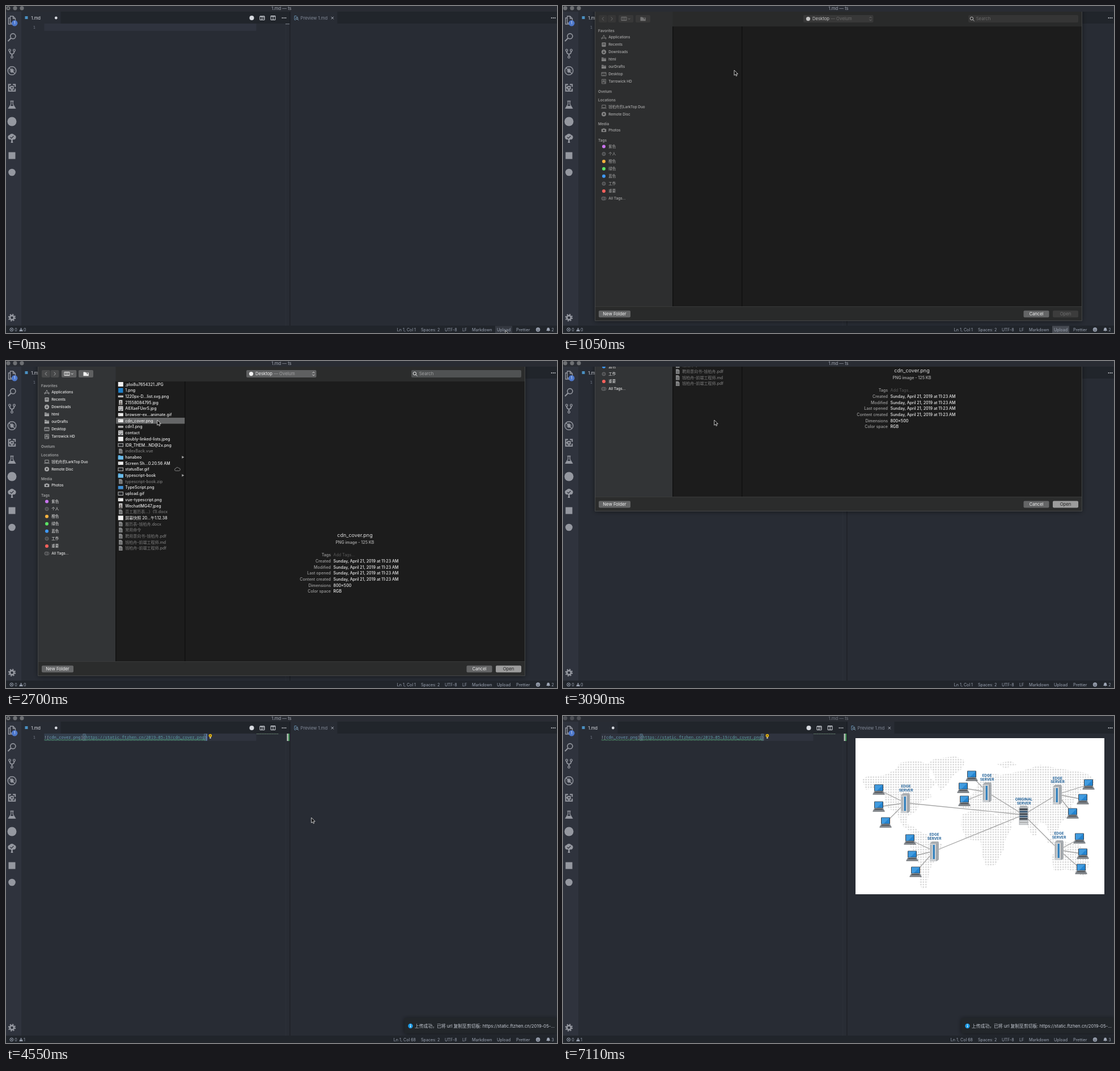
Write an HTML page that moves like this. It is 972 by 576 pixels and loops after 7.21 s.

```html
<!DOCTYPE html>
<html lang="en">
<head>
<meta charset="utf-8">
<title>Upload from the editor</title>
<style>
html, body { margin: 0; width: 100%; height: 100%; overflow: hidden; background: #282c34; }
svg { display: block; width: 972px; height: 576px; font-family: Inter, "Noto Sans CJK SC", "Noto Sans CJK", sans-serif; }
text { white-space: pre; }
.code { font-family: "Noto Sans Mono", "DejaVu Sans Mono", monospace; }
#dialog {
  --bar: #292a2a; --side: #2d2e2f; --text: #ababab; --head: #9b9b9b; --btn: #383838; --nav: #363636;
  --icon: #828282; --sign: #747474; --field: #353535; --hint: #6a6a6a; --path: #c4c4c4;
  --open: #3c3c3c; --openText: #707070;
}
#dialog.on {
  --bar: #2b2c2c; --side: #323436; --text: #e9e9e9; --head: #a2a3a4; --btn: #5f6061; --nav: #48494a;
  --icon: #a5a6a7; --sign: #f0f0f0; --field: #505253; --hint: #a0a1a2; --path: #f2f2f2;
}
#dialog.picked { --open: #9c9c9c; --openText: #242424; }
</style>
</head>
<body>
<script>
const LOOP = 7210;

// ---- markup helpers ----
const box = (x, y, w, h, fill, more = '') =>
  `<rect x="${x}" y="${y}" width="${w}" height="${h}" style="fill:${fill}" ${more}/>`;
const dot = (x, y, r, fill, more = '') => `<circle cx="${x}" cy="${y}" r="${r}" style="fill:${fill}" ${more}/>`;
const line = (d, color, w = 1, more = '') =>
  `<path d="${d}" style="fill:none;stroke:${color};stroke-width:${w}" ${more}/>`;
const shape = (d, fill, more = '') => `<path d="${d}" style="fill:${fill}" ${more}/>`;
const at = (x, y, body) => `<g transform="translate(${x} ${y})">${body}</g>`;
// y is the middle of the capitals
const text = (x, y, s, size = 7.12, fill = '#9da5b4', more = '') =>
  `<text x="${x}" y="${(y + size * 0.364).toFixed(2)}" font-size="${size}" style="fill:${fill}" ${more}>${s}</text>`;
const mid = 'text-anchor="middle"', end = 'text-anchor="end"', bold = 'font-weight="600"', medium = 'font-weight="500"';
const layer = (id, body, more = '') => `<g id="${id}" ${more}>${body}</g>`;

const grey = '#9598a0';
const HOST = 'https://static.ftzhen';

// ---- editor window ----
function activityBar() {
  const icons = [
    [25, line('M-3-7h5l4 4v8h-9zM2-7v4h4M-3-4h-3v11h8v-2', grey, 1.3)],
    [55, `<circle cx="1.8" cy="-1.8" r="4.6" style="fill:none;stroke:${grey};stroke-width:1.6"/>` + line('M-1.5 1.5L-7 7', grey, 2)],
    [84, [[-4, -6], [4, -6], [0, 6]].map(p => `<circle cx="${p[0]}" cy="${p[1]}" r="1.8" style="fill:none;stroke:${grey};stroke-width:1.3"/>`).join('') +
      line('M-4-4q0 4 4 5q4-1 4-5M0 1v3', grey, 1.8)],
    [114, line('M-7.3 0a7.3 7.3 0 1 0 14.6 0a7.3 7.3 0 1 0-14.6 0M-5-5L5 5', grey, 1.4) +
      line('M-5 0h10M-4-3l8 6M-4 3l8-6M0-5v9', grey, .8) + '<ellipse rx="2.4" ry="3.4" fill="' + grey + '"/>'],
    [144, line('M-1.5-5.7H-5.7V5.7H5.7V1.5M1.5-5.7H5.7V-1.5M-2.2-2.2h4.4v4.4h-4.4zM-5.7 0h3M0 5.7v-3', grey, 2)],
    [174, line('M-3-6.5h6M-1.7-6v5L-6 6H6L1.7-1v-5', grey, 1.3) + shape('M-3.4 2h6.8L6 6.6H-6z', grey)],
    [203.5, dot(0, 0, 8, grey)],
    [233, shape('M-7-1a4 4 0 0 1 3-5a5 5 0 0 1 8 0a4 4 0 0 1 3 5q-1 4-5 3l-1 2 1 4h-4l1-4-1-2q-4 1-5-3z', grey) + line('M-3-2l2 2 4-4', '#2f333d', 1.2)],
    [263.5, box(-6, -6, 12, 12, grey)],
    [293, dot(0, 0, 6.3, grey)],
    [549, `<circle r="3.6" style="fill:none;stroke:${grey};stroke-width:2.6"/>` +
      `<circle r="5.7" style="fill:none;stroke:${grey};stroke-width:2;stroke-dasharray:2.24 2.24"/>`],
  ];
  return box(0, 10, 27, 553, '#2f333d') + icons.map(([y, body]) => at(10.5, y, body)).join('') +
    dot(15.2, 30.3, 5.2, '#4d78cc') + text(15.2, 30.3, '1', 6, '#f4f6fa', mid);
}

function tabs() {
  const ink = '#d7dae0', dots = x => [-3, 0, 3].map(d => dot(x + d, 21, .9, ink)).join('');
  return box(27, 10, 945, 21, '#21252b') + box(27, 10, 69.5, 21, '#282c34') +
    box(33.5, 18, 5, 5, '#4a90c2') + text(44.3, 21, '1.md', 7.7, ink) + dot(88.3, 21, 2.4, ink) +
    dot(433.5, 21, 4, ink) + dots(490.5) +
    line('M448 18h8v6.5h-8zM448 18.5h8M451.5 18v6.5M453 21h3', ink, 1) +
    line('M467.2 17.5h7.8v7h-7.8zM467 18h8M471.1 17.5v7', ink, 1) +
    box(502, 10, 82.5, 21, '#282c34') +
    line('M509 24v-6.5h3l2 2v1M509 24.5h2', '#6d9bbf', .9) + line('M511.5 22a1.7 1.7 0 1 0 3.4 0a1.7 1.7 0 1 0-3.4 0M514.5 23.5l1.7 1.7', '#8fb0c8', .9) +
    text(519.5, 21, 'Preview 1.md', 7.7, '#828997') + line('M573.6 18.9l4.4 4.4m0-4.4l-4.4 4.4', '#a8adb8', 1) + dots(965.5);
}

function statusBar() {
  const c = '#9da5b4', items = [[732, 'Spaces: 2'], [774, 'UTF-8'], [805, 'LF'], [822, 'Markdown'], [866, 'Upload'], [900, 'Prettier']];
  return box(0, 563, 972, 13, '#21252b') + box(863, 563.5, 30, 12.5, '#343840', 'id="hot"') +
    line('M6.9 570a3 3 0 1 0 6 0a3 3 0 1 0-6 0M8.5 568.6l2.8 2.8m0-2.8l-2.8 2.8', c, .9) + text(15.2, 570, '0') +
    shape('M26.6 566.5l3.4 6.4h-6.8z', c) + box(26.2, 568.7, .9, 2.2, '#21252b') + text(31, 570, '0', 7.12, c, 'id="warn"') +
    text(723, 570, '', 7.12, c, end + ' id="pos"') + items.map(([x, s]) => text(x, 570, s)).join('') +
    dot(938.5, 570, 3.7, c) + dot(937.2, 569, .6, '#21252b') + dot(939.8, 569, .6, '#21252b') + line('M936.5 570.7q2 2.4 4 0', '#21252b', .8) +
    shape('M953 572q1.2-1 1.2-3a2.4 2.4 0 0 1 4.8 0q0 2 1.2 3zM955.6 572.5h2l-1 1z', c) + text(962.3, 570, '2', 7.12, c, 'id="bell"');
}

function editor() {
  const cw = 286.5 / 67, x0 = 67.5, col = n => x0 + n * cw;
  let wave = `M${x0} 42.2`;
  for (let i = 0; i < 95; i++) wave += `q.75 ${i % 2 ? 1.2 : -1.2} 1.5 0t1.5 0`;
  const span = (s, c) => `<tspan style="fill:${c}">${s}</tspan>`;
  const bracket = n => `<rect x="${col(n)}" y="31.8" width="${cw}" height="11.2" style="fill:#3c5060;stroke:#6a8496;stroke-width:.6"/>`;
  return box(67.5, 31, 374, 12.8, '#2f333e') + box(493, 31, .6, 532, '#30343c') +
    text(52, 37.5, '1', 7.13, '#7a8290', end + ' class="code"') +
    layer('blank', box(493, 31, 7.5, 1.2, '#747982')) +
    layer('link', box(x0, 31, 286.5, 12.8, '#333e4c', 'id="sel"') + bracket(16) + bracket(66) +
      text(x0, 37.5, span('![', '#98a2ae') + span('cdn_cover.png', '#6b9db3') + span('](', '#98a2ae') +
        span(HOST + '.cn/2019-05-19/cdn_cover.png', '#5f9ca5') + span(')', '#98a2ae'), 7.13, '#9da5b4', 'class="code"') +
      line(`M${col(17)} 41.2H${col(66)}`, '#548b8c', .6, 'id="under"') +
      layer('wave', line(wave, '#4fa567', .9)) +
      line('M442 31.5h39', '#66806f', 1, 'stroke-dasharray="2.4 .6"') +
      box(495.5, 31, 2.7, 13, '#b3bbb4') + box(498.2, 31, 2.3, 13, '#3f9a55') +
      layer('bulb', dot(360.4, 34.6, 2.8, '#e5b512') + dot(360.4, 34.4, 1, '#51430f') + box(359.3, 37.2, 2.2, 2.6, '#c9c9c0'))) +
    box(353.6, 31.5, 1, 12, '#6f95e8', 'id="caret"');
}

// ---- preview picture ----
function network() {
  const land = 'M527 112l10-6 30-2 20-10 8-12 30-4 22 8-2 20 14 12-14 14 6 10-20 10-8 16-14 8-4 14 16 6 12 12-10 2-24-16-10-22-18-12-6-26-14-8-16 4z' +
    'M640 86l16-11 36-4 18 8-6 14-16 12-12 18-10 8-8-14-6-20z' +
    'M610 206l16-4 24 10 18 14-4 18-12 16-6 14-4 28-8 3-6-10 2-32-12-22-10-20z' +
    'M703 174l20-8 30 4 14 6 16 18h10l-12 22-4 20-14 26-16 4-8-22-2-22-26-6-9-22z';
  const east = 'M702 162l4-16 16-8 10-18 20-20 20 4 40-8 30-10 30 6 50 8 17 12-4 10-18 6-12 14-6 14-4 20-16 10-10 26-10-2-8-20-12-4-4 24h-8l-12-26-16-4-12 14-16-16-10-10h-24z' +
    'M862 246l14-12 22-6 12-2 14 18 4 18-8 22-14-8-18-6-22 4zM850 214l30 6 32 8-6 6-50-10zM764 84l26-5 10 7-20 6z';
  const hub = [812.5, 174];
  const sites = [
    { at: [604, 153], label: [605, 124], pcs: [[557, 130], [557, 160], [569, 188]] },
    { at: [748, 134], label: [748, 105], pcs: [[721, 106], [706, 127], [708, 150]] },
    { at: [872, 138], label: [872.5, 109.5], pcs: [[927, 121], [917, 147], [899, 172]] },
    { at: [655, 238], label: [655, 209], pcs: [[612, 218], [616, 247], [622, 275]] },
    { at: [875, 236], label: [875, 207], pcs: [[911, 216], [917, 243], [914, 270]] },
  ];
  const wire = (a, b) => line(`M${a}L${b}`, '#a4a4a4', 1.3);
  const tower = shape('M-8-13l4-4H7l1 3V15l-4 3H-8z', '#a9adb1') + box(-8, -13, 12, 31, '#cdd0d3') +
    box(-2.4, -11, 3.2, 25, '#2e7fbd') + box(-6.4, -11, 1.2, 25, '#909498') + line('M4-13V17', '#7d8287', .8);
  const rack = shape('M-8-12l2-4H6l2 4V18H-8z', '#aeb2b6') + [0, 1, 2, 3, 4].map(i => box(-7, -11 + i * 4.2, 14, 2.8, i % 2 ? '#3b5b78' : '#3d444c')).join('') +
    box(-7, 10.5, 14, 7, '#cfd2d4') + line('M-7 13.5H7', '#888', .8);
  const laptop = box(-8, -9.5, 16, 12, '#39424c', 'rx="1"') + box(-7, -8.5, 14, 10, '#2484d0') + shape('M-7-8.5H7L-3 1.5H-7z', '#419bdf') +
    shape('M-8 2.5H8l2.5 5h-21z', '#8b8f94') + shape('M-6.5 3.3h13l1 2h-15z', '#4b5056') + box(-10.5, 7.2, 21, 1.3, '#5c6166');
  const label = ([x, y], s) => [s, 'SERVER'].map((w, i) => text(x, y + i * 6.5, w, 6.3, '#23639a', mid + ' font-weight="700"')).join('');
  return box(516, 39, 439, 275, '#fff') + `<path d="${land}${east}" fill="url(#dots)"/>` +
    sites.map(s => wire(hub, s.at) + s.pcs.map(p => wire(s.at, p)).join('')).join('') +
    sites.map(s => at(...s.at, tower) + s.pcs.map(p => at(...p, laptop)).join('') + label(s.label, 'EDGE')).join('') +
    at(...hub, rack) + label([813, 147], 'ORIGINAL');
}

function toast() {
  return box(703, 532, 270, 27, '#21252b', 'filter="url(#soft)"') + dot(713.5, 546, 4.2, '#1c9be6') +
    box(713, 545, 1.1, 3.4, '#fff') + dot(713.5, 543.5, .7, '#fff') +
    text(721, 546, '', 7.8, '#c5cad3', 'id="msg"') +
    layer('tools', dot(944, 546, 2.4, 'none', 'stroke="#c5cad3" stroke-width="1.6"') + line('M956.5 543.5l5 5m0-5l-5 5', '#c5cad3', 1));
}

// ---- file dialog ----
const ME = '钱柏舟';
const FILES = [
  ['w', ';ploi8u7654321.JPG'], ['b', '1.png'], ['s', '1220px-D...list.svg.png'], ['p', '21558084795.jpg'],
  ['x', 'A6XaeFUerS.jpg'], ['m', 'browser-ex...animate.gif'], ['m', 'cdn_cover.png'], ['s', 'cdn1.png'],
  ['x', 'contact'], ['w', 'doubly-linked-lists.jpeg'], ['o', 'IDR_THEM...ND@2x.png'], ['d', 'indexBack.vue'],
  ['f', 'hanabeo'], ['m', 'Screen Sh...0.20.56 AM'], ['o', 'statusBar.gif'], ['f', 'typescript-book'],
  ['d', 'typescript-book.zip'], ['t', 'TypeScript.png'], ['o', 'upload.gif'], ['m', 'vue-typescript.png'],
  ['p', 'WechatIMG47.jpeg'], ['d', '员工履历表...）(1).docx'], ['w', '屏幕快照 20...午1.12.38'], ['d', `履历表-${ME}.docx`],
  ['d', '常用命令'], ['d', `聘用意向书-${ME}.pdf`], ['d', `${ME}-前端工程师.md`], ['d', `${ME}-前端工程师.pdf`],
];
const rowY = i => 41 + i * 10.7;
const doc = shape('M-3.3-4.2h4.4l2.2 2.2v6.2h-6.6z', '#858687') + line('M-2 0h4M-2 2h4', '#4b4c4d', .7);
const thumbs = {
  w: box(-4.5, -4, 9, 8, '#f1f1f1'),
  m: box(-4.5, -2.8, 9, 5.6, '#eee') + box(-3, -.6, 1.6, 1.2, '#9a8f88'),
  s: box(-4.5, -1.6, 9, 3.2, '#d6d6d6') + line('M-3.5 0h7', '#777', .8),
  b: box(-4.2, -4.2, 8.4, 8.4, '#1f7fc8'),
  t: box(-4.5, -2.8, 9, 5.6, '#3f8fd4'),
  p: box(-3, -4.3, 6, 8.6, '#d2d2d2') + dot(0, -1, 1.5, '#6d6663') + box(-2, 1, 4, 3, '#6d6663'),
  x: box(-4.2, -4.2, 8.4, 8.4, '#dcdcdc') + line('M-3-2h3M1-2h2M-3 1h2M0 1h3M-2 3h4', '#55585c', 1.2),
  o: box(-4.3, -2.8, 8.6, 5.6, '#26282b', 'stroke="#d5d5d5" stroke-width=".8"'),
  f: shape('M-4.5-3.5h3.5l1 1h4.5v6.5h-9z', '#4fa5d8') + box(-4.5, -1.4, 9, 5.4, '#6cbbe8'),
  d: doc,
};

function fileList() {
  return box(194, 99.9, 121.3, 10.6, '#656667', 'id="pick"') + FILES.map(([kind, name], i) => {
    const late = i === 6 || i === 14, y = rowY(i);
    const icon = at(202.3, y, thumbs[kind]);
    return (late ? `<g class="late">${icon}</g><g class="early">${at(202.3, y, doc)}</g>` : icon) +
      text(210.3, y, name, 7, kind === 'd' ? '#7c7c7c' : '#ececec', medium) +
      (kind === 'f' ? shape(`M310.3 ${y - 2.3}l4 2.3-4 2.3z`, '#a5a5a5') : '') +
      (i === 14 ? line(`M299.5 ${y + 2.6}a2 2 0 0 1 0-4a2.8 2.8 0 0 1 5.2-.6a2.3 2.3 0 0 1 .6 4.6z`, '#9a9a9a', .8) : '');
  }).join('');
}

function sidebar() {
  const c = 'var(--icon)', ln = d => line(d, c, .9);
  const folder = shape('M-4-3.3h3l1 1h4v5.6h-8z', c) + line('M-4-1h8', 'var(--side)', .6);
  const places = [
    [55, 'Applications', ln('M-3.8 3.8L0-3.8 3.8 3.8M-5 1.4H5')],
    [68, 'Recents', box(-3.6, -3.8, 7.2, 7.6, c, 'rx="1"') + line('M-2.2-1.6h4.4M-2.2.2h4.4', 'var(--side)', .8)],
    [81, 'Downloads', dot(0, 0, 4.2, c) + line('M0-2.4v4.2M-1.8.2L0 2l1.8-1.8', 'var(--side)', 1)],
    [94, 'html', folder], [107, 'ourDrafts', folder],
    [120, 'Desktop', ln('M-4-3h8v6h-8zM-4-1.6h8M-2.5 1.8h5')],
    [133, 'Tarrowick HD', ln('M-3.4-3.8h6.8v7.6h-6.8zM-3.4 1h6.8') + ln('M-2-2h4M-2-.4h4M1 2.4h1.4')],
    [177.3, ME + '的LarkTop Duo', ln('M-3.2-2.8h6.4v4.4h-6.4zM-4.8 2.8h9.6')],
    [190.4, 'Remote Disc', dot(0, 0, 4, c) + dot(0, 0, 1.3, 'var(--side)')],
    [219, 'Photos', box(-4.3, -2.4, 8.6, 5.4, c, 'rx=".8"') + box(-1.6, -3.4, 3.2, 1.4, c) + dot(0, .3, 1.5, 'var(--side)')],
  ];
  const heads = [[43.5, 'Favorites'], [150.5, 'Ovelum'], [166, 'Locations'], [207.7, 'Media'], [236.5, 'Tags']];
  const tags = [['紫色', '#c974ee'], ['个人'], ['橙色', '#f7b23f'], ['绿色', '#5be265'], ['蓝色', '#3f98f7'], ['工作'], ['重要', '#f7605c'], ['All Tags...']];
  const ring = 'stroke="#77787a" stroke-width=".8"';
  return box(57, 10, 136.5, 519, 'var(--side)') +
    heads.map(([y, s]) => text(62, y, s, 6.5, 'var(--head)', bold)).join('') +
    places.map(([y, s, icon]) => at(72, y, icon) + text(80.2, y, s, 6.45, 'var(--text)', medium)).join('') +
    tags.map(([s, color], i) => {
      const y = 247.5 + i * 13.08;
      return (i === 7 ? dot(73.3, y, 2.8, 'none', ring) : '') + dot(i === 7 ? 71 : 72, y, 3, color || '#48494b', color ? '' : ring) +
        text(80.2, y, s, 6.5, 'var(--text)', medium);
    }).join('');
}

function dialog() {
  const button = (x, w, s, fill, ink) => box(x, 536.5, w, 12, fill, 'rx="2"') + text(x + w / 2, 542.5, s, 7.7, ink, mid);
  const tool = (x, w, fill = 'var(--btn)') => box(x, 16, w, 13, fill, 'rx="2"');
  const sign = (d, w = 1) => line(d, 'var(--sign)', w);
  const date = 'Sunday, April 21, 2019 at 11:23 AM';
  const info = [['Tags', 'Add Tags...'], ['Created', date], ['Modified', date], ['Last opened', date],
    ['Content created', date], ['Dimensions', '800×500'], ['Color space', 'RGB']];
  return box(56.5, 0, 859, 554.5, '#1e1e1e', 'filter="url(#soft)"') + box(57, 10, 858, 26, 'var(--bar)') + sidebar() +
    box(57, 529, 858, 25, 'var(--bar)') + box(57, 529, 858, .8, '#3d3e3e') +
    box(193.3, 36, 1, 493, '#0b0b0b') + box(315.3, 36, 1, 493, '#0b0b0b') +
    line('M56.6 10V554.4H915.4V10', '#4c4e50', .9) +
    tool(63, 14.8, 'var(--nav)') + tool(78.8, 14.6, 'var(--nav)') + line('M71.8 19.5l-2.6 3 2.6 3M84.8 19.5l2.6 3-2.6 3', 'var(--hint)', 1) +
    tool(98, 26.3) + sign('M103 19.5h9v6h-9zM106 19.5v6M109 19.5v6') + sign('M115 21.8l1.7 1.7 1.7-1.7') +
    tool(128, 26) + shape('M136.5 19.5h3.5l1 1h4.8v5.7h-9.3z', 'var(--sign)') + line('M142 22h3M143.5 20.5v3', 'var(--btn)', .8) +
    tool(424, 123.5) + dot(432.5, 22.6, 3.6, 'var(--path)') +
    text(440, 22.6, 'Desktop <tspan style="fill:var(--hint)">— Ovelum</tspan>', 7.7, 'var(--path)') +
    sign('M540.5 21.3l2-2 2 2M540.5 23.8l2 2 2-2', .9) +
    box(715, 16, 194, 13, 'var(--field)', 'rx="2"') +
    line('M718.2 22a2.7 2.7 0 1 0 5.4 0a2.7 2.7 0 1 0-5.4 0M722.9 24l2.6 2.6', 'var(--path)', .9) + text(728.7, 22.6, 'Search', 7.7, 'var(--hint)') +
    button(63, 56, 'New Folder', '#646566', '#f0f0f0') + button(812.5, 45, 'Cancel', '#646566', '#f0f0f0') +
    button(864, 45, 'Open', 'var(--open)', 'var(--openText)') +
    layer('files', fileList()) +
    layer('info', text(615.5, 307, 'cdn_cover.png', 9, '#dedede', mid) + text(615.5, 319.5, 'PNG image - 125 KB', 7.1, '#a0a0a0', mid + ' ' + bold) +
      info.map(([k, v], i) => {
        const y = 341.5 + i * 10.72;
        return text(573, y, k, 7.1, '#a0a0a0', end + ' ' + medium) + text(577.5, y, v, 7.1, i ? '#ececec' : '#5a5a5a', i ? medium : '');
      }).join(''));
}

document.body.innerHTML = `<svg viewBox="0 0 972 576" width="972" height="576"><defs>
<pattern id="dots" width="4.4" height="4.4" patternUnits="userSpaceOnUse"><circle cx="2.2" cy="2.2" r="1.3" fill="#d2d2d2"/></pattern>
<filter id="soft" x="-10%" y="-20%" width="120%" height="140%"><feDropShadow dx="0" dy="1" stdDeviation="4" flood-color="#000" flood-opacity=".5"/></filter>
<clipPath id="below"><rect y="10" width="972" height="566"/></clipPath></defs>` +
  box(0, 0, 972, 576, '#282c34') + tabs() + editor() + box(500.3, 10, 1.2, 553, '#1c1f25') + activityBar() +
  layer('image', network()) + layer('toast', toast()) + statusBar() +
  box(0, 0, 972, 10, '#292c33') + layer('lights', [4, 16, 28].map(x => dot(x, 3.8, 3.6, '#6d6f73')).join('') + dot(4, 3.8, 1.2, '#26282c', 'id="dirty"')) +
  text(486, 3.8, '1.md — ts', 7.7, '#a3a8b3', mid + ' id="title"') +
  `<g clip-path="url(#below)">${layer('dialog', dialog())}</g>` +
  layer('mouse', `<path d="M0 0V9.2L2.1 7.3 3.5 10.4 5 9.7 3.7 6.7H6.5z" fill="#0b0b0b" stroke="#f2f2f2" stroke-width=".8"/>`) + '</svg>';

// ---- timeline ----
const $ = id => document.getElementById(id);
const show = (id, on) => $(id).style.display = on ? '' : 'none';
const all = (sel, on) => document.querySelectorAll(sel).forEach(e => e.style.display = on ? '' : 'none');
const step = (t, keys) => keys.reduce((v, k) => t >= k[0] ? k : v, keys[0]);

const MOUSE = [[0, 881, 571.5], [210, 860, 561], [720, 600, 330], [1050, 302, 113], [1470, 269.5, 90.5], [1830, 269.5, 98.5],
  [2190, 266.8, 104], [3870, 400, 150], [4160, 538.7, 179], [4940, 620, 240], [5150, 782, 399.5], [5630, 884.3, 526],
  [5900, 895.3, 539.5], [6190, 960, 566], [6430, -20, -20]];
const SHEET = [[0, -600], [720, -180], [1050, 0], [3090, -290], [3450, -600]];
const CARET = [[0, 0], [3870, 1], [5150, 0], [5630, 1], [6190, 0], [6760, 1], [7110, 0]];

function draw(t) {
  const open = t >= 720 && t < 3450, linked = t >= 3870, done = t >= 4160, hover = t >= 6190 && t < 6430, blurred = t >= 7110;
  const picked = t >= 2700;

  show('dialog', open);
  $('dialog').setAttribute('transform', `translate(0 ${step(t, SHEET)[1]})`);
  $('dialog').setAttribute('class', (t >= 1470 ? 'on' : '') + (picked ? ' picked' : ''));
  show('files', t >= 1470);
  all('.late', t >= 2190);
  all('.early', t < 2190);
  show('pick', picked);
  show('info', picked);

  show('hot', t < 1470);
  $('hot').style.fill = t < 720 ? '#343840' : '#474b53';
  $('pos').textContent = linked ? 'Ln 1, Col 68' : 'Ln 1, Col 1';
  $('warn').textContent = done ? '1' : '0';
  $('bell').textContent = done ? '3' : '2';

  show('blank', !linked);
  show('link', linked);
  show('wave', done);
  show('under', t >= 4550);
  show('bulb', t >= 4550);
  show('sel', !blurred);
  show('caret', step(t, CARET)[1]);

  show('toast', linked);
  $('toast').style.opacity = done ? 1 : .5;
  $('msg').textContent = '上传成功，已将 url 复制至剪切板: ' + HOST + (hover ? '...' : '.cn/2019-05-...');
  show('tools', hover);
  show('image', t >= 4940);

  show('dirty', !open && !blurred);
  $('lights').style.opacity = blurred ? .55 : 1;
  $('title').style.opacity = blurred ? .6 : 1;
  const [, x, y] = step(t, MOUSE);
  $('mouse').setAttribute('transform', `translate(${x} ${y})`);
}

const start = performance.now();
function tick() {
  draw((performance.now() - start) % LOOP);
  requestAnimationFrame(tick);
}
tick();
</script>
</body>
</html>
```
